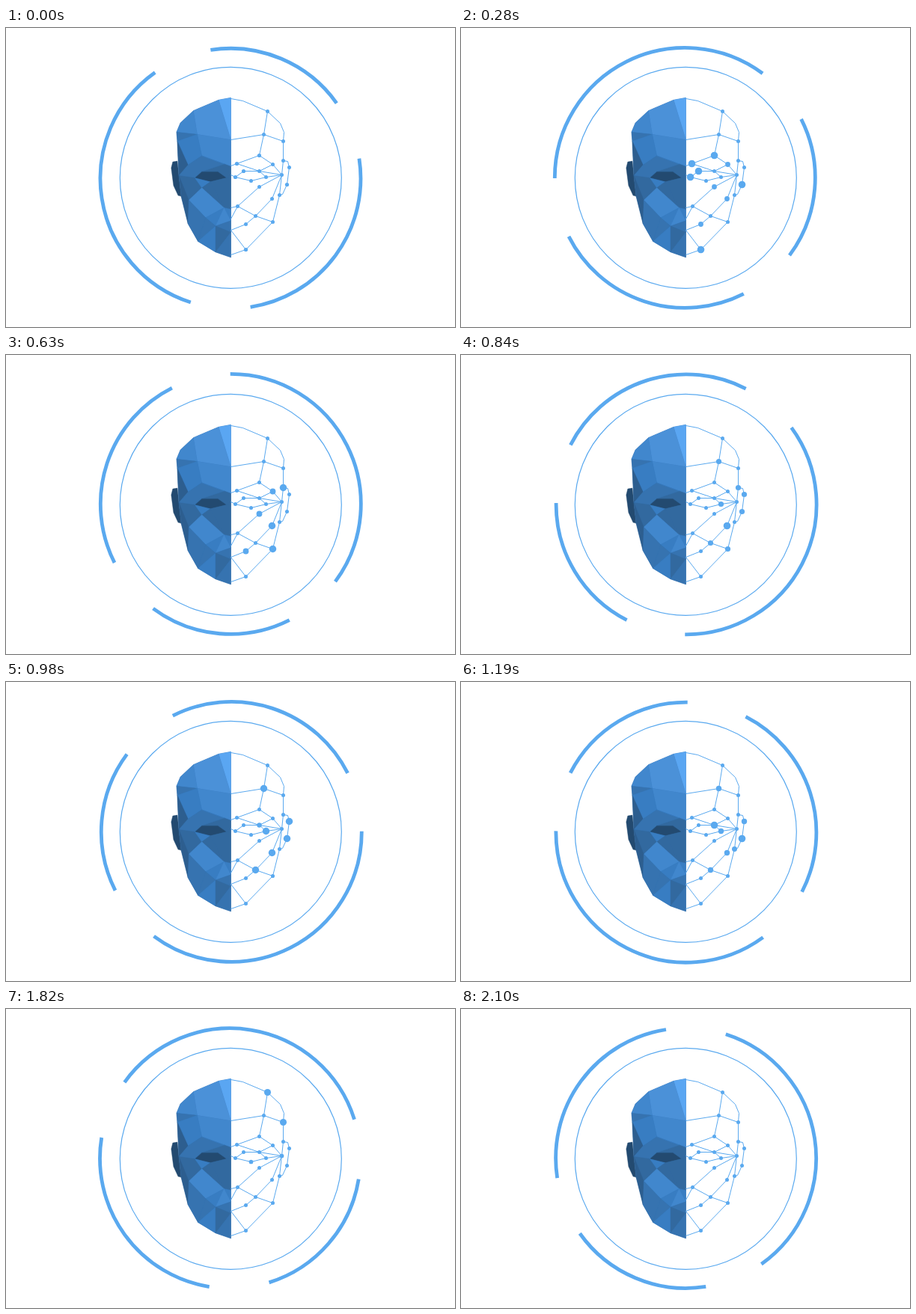
Animation of 600x400 px, one loop 2170 ms. Source, as an HTML page:

```html
<!DOCTYPE html>
<html>
<head>
<meta charset="utf-8">
<style>
html, body { margin: 0; width: 100%; height: 100%; overflow: hidden; background: #fff }
svg { display: block }
</style>
</head>
<body>
<svg width="600" height="400" viewBox="0 0 600 400">
  <g fill="none" stroke="#5aa9ef">
    <circle cx="300.3" cy="200.4" r="148" stroke-width="1.2"/>
    <g id="ring" stroke-width="4.8"></g>
  </g>
  <!-- the solid half is the wire half mirrored and slightly enlarged -->
  <g id="solid" transform="translate(300.5 150.5) scale(-1.022 1.022)" stroke-width=".4" stroke-linejoin="round"></g>
  <g transform="translate(300.5 150.5)">
    <g id="wires" fill="none" stroke="#5aa9ef"></g>
    <g id="nodes" fill="#5aa9ef"></g>
  </g>
</svg>
<script>
const STEP = 70, LOOP = 2170;
const $ = id => document.getElementById(id);

function add(id, tag, attrs) {
  const el = document.createElementNS('http://www.w3.org/2000/svg', tag);
  for (const key in attrs) el.setAttribute(key, attrs[key]);
  return $(id).appendChild(el);
}

// Half a face: capitals are nodes, small letters plain corners
const mesh = {};
`A49,-39 B44,-8 C70,1 D38,20 E8,31 F56,32 G70,27 H78,36 I17,41 J38,41 K6,49 L47,49
 M68,46 N27,54 O38,62 P75,59 Q65,73 R55,78 S9,88 T33,101 U20,112 V56,109 W20,146
 a0,-56 b16,-53 c66,-23 d71,-11 e0,-1 f0,34 g0,46 h0,90 i0,105 j0,120 k0,153
 l43,132 m76,28 n69,72`.split(/\s+/).forEach(p => mesh[p[0]] = p.slice(1));
const trace = path => [...path].map(c => mesh[c]).join(' ');

for (const path of 'abAcdCGMQVWk GmHPnQ eBC ABDFM DEf EJF JM gKIJLNK LM MOSh iSTV MRTUjW'.split(' '))
  add('wires', 'polyline', { points: trace(path) });

// Each facet ends with its shade, 0 dark to 9 light
const facets = `GmHPnQM0 abAcdCMQVlWk4 abe9 bABe7 AcdB6 BefD6 dBC4 CBDF5 CFM2 MFDEJL4 DfE5
  EfgKIJ3 LJIKN0 MLOR3 MRVQ2 LNO5 ONS3 NKghS3 ROST6 RTlV4 TSU5 TUl4 lUW5 Shi5 SiU6
  Uij4 UjW3 Wjk4`;
for (const facet of facets.split(/\s+/)) {
  const shade = +facet.slice(-1);
  const color = `hsl(210, ${52 + 33 * (shade / 9) ** 4}%, ${29 + 4 * shade}%)`;
  add('solid', 'polygon', { points: trace(facet.slice(0, -1)), fill: color, stroke: color });
}

const polar = deg => {
  const a = deg * Math.PI / 180;
  return `${174 * Math.cos(a)} ${174 * Math.sin(a)}`;
};
let from = 261.2;
for (const span of [63.4, 90, 126.8]) {
  add('ring', 'path', { d: `M${polar(from)}A174 174 0 0 1 ${polar(from + span)}` });
  from += span + 26.6;
}

// Groups of nodes swell one after another, 180 ms apart
const waves = 'DEIKPW FORU GRV R BHLPRT JP Q MN AC'.split(' ');
const nodes = Object.keys(mesh).filter(c => c < 'a').map(name => {
  const [cx, cy] = mesh[name].split(',');
  return { name, dot: add('nodes', 'circle', { cx, cy }) };
});

const pulse = offset =>
  Math.abs(offset) < 350 ? (1 + Math.cos(Math.PI * offset / 350)) / 2 : 0;

function draw(t) {
  // the ring sits slightly off its pivot
  $('ring').setAttribute('transform',
    `translate(300.3 200.4) rotate(${t / STEP * 18}) translate(-.31 .95)`);
  for (const { name, dot } of nodes) {
    const swell = waves.map((wave, i) => wave.includes(name) ? pulse(t - 300 - 180 * i) : 0);
    dot.setAttribute('r', 2.5 + 2.3 * Math.max(...swell));
  }
}

const start = performance.now();
function tick() {
  const t = (performance.now() - start) % LOOP;
  draw(Math.floor(t / STEP) * STEP);
  requestAnimationFrame(tick);
}
tick();
</script>
</body>
</html>
```
